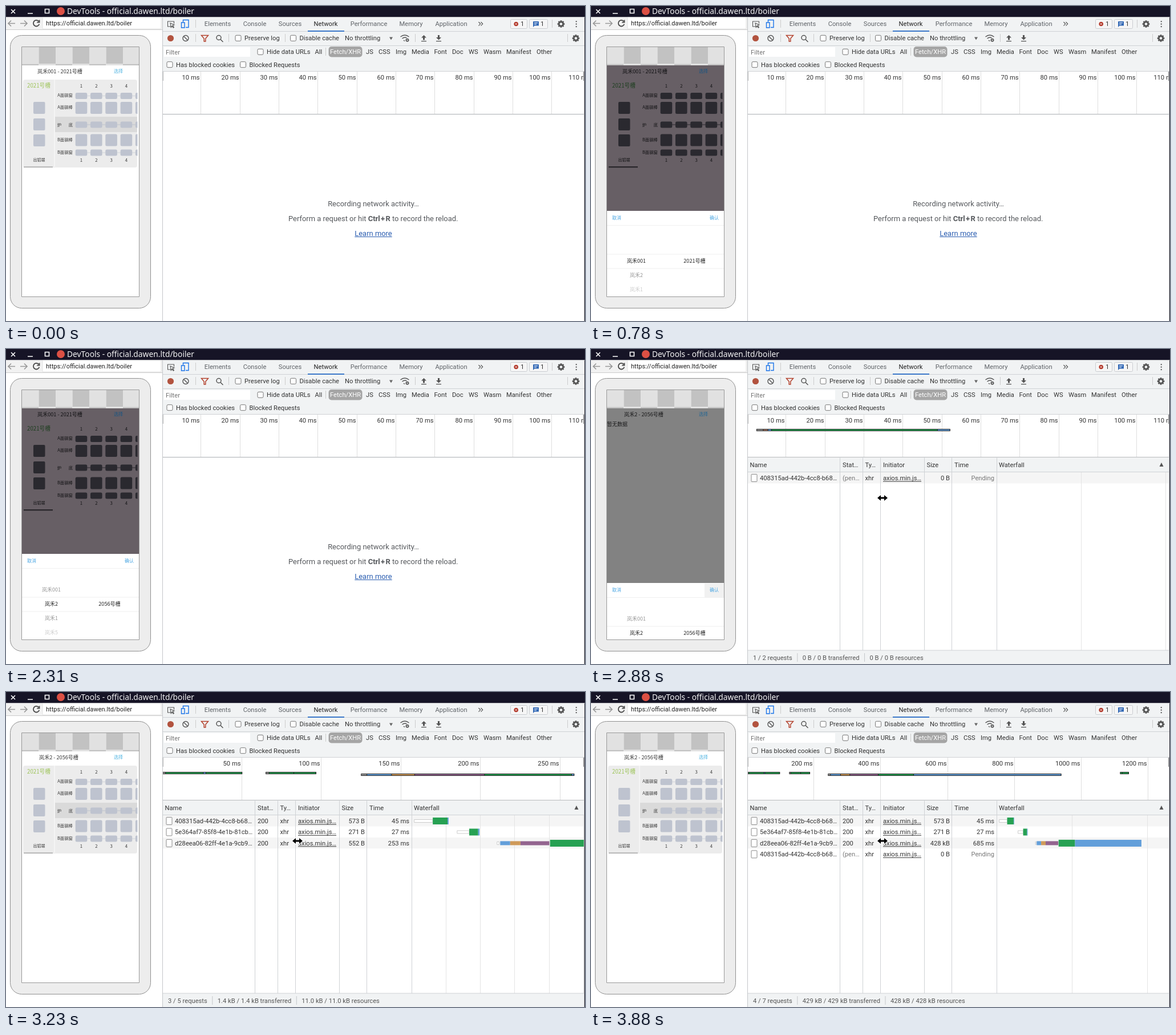
An HTML page with a canvas that plays this animation: 1015 by 552 pixels, repeating every 8 s.

```html
<!DOCTYPE html>
<html lang="en">
<head>
<meta charset="utf-8">
<title>DevTools</title>
<style>
html, body { margin: 0; width: 100%; height: 100%; overflow: hidden; background: #fff; }
canvas { display: block; }
</style>
</head>
<body>
<canvas id="stage" width="1015" height="552"></canvas>
<script>
const c = document.getElementById('stage').getContext('2d');
const LOOP = 8000, STEP = 40;
const UI = 'Roboto, sans-serif', CJK = '"Noto Sans CJK SC", "Noto Sans CJK", sans-serif';
const GREY = '#999', GREEN = '#27a153', BLUE = '#639fda', ORANGE = '#cf9a5a', PURPLE = '#93648f';

const clamp = v => Math.max(0, Math.min(1, v));
const lerp = (a, b, k) => a + (b - a) * k;
const mix = (a, b, k) => `rgb(${a.map((v, i) => Math.round(lerp(v, b[i], k)))})`;
const snap = (t, from) => from + Math.floor((t - from) / STEP) * STEP;

// CSS "ease" curve, solved by bisection
function ease(x) {
  x = clamp(x);
  let lo = 0, hi = 1, s;
  for (let i = 0; i < 20; i++) {
    s = (lo + hi) / 2;
    if (.75 * s * (1 - s) + s ** 3 < x) lo = s; else hi = s;
  }
  return .3 * s * (1 - s) ** 2 + 3 * (1 - s) * s * s + s ** 3;
}

function rect(x, y, w, h, fill, stroke, r = 0) {
  c.beginPath();
  c.roundRect(x, y, w, h, r);
  if (fill) { c.fillStyle = fill; c.fill(); }
  if (stroke) { c.strokeStyle = stroke; c.lineWidth = 1; c.stroke(); }
}

function path(d, color, width = 1.3, fill) {
  const p = new Path2D(d);
  c.strokeStyle = color;
  c.lineWidth = width;
  if (fill) { c.fillStyle = fill; c.fill(p); }
  if (width) c.stroke(p);
}

// y is the middle of the capitals
function text(s, x, y, { size = 11.2, color = '#333', align = 'left', font = UI, weight = 400 } = {}) {
  c.font = `${weight} ${size}px ${font}`;
  c.fillStyle = color;
  c.textAlign = align;
  c.fillText(s, x, y + size * .355);
  return c.measureText(s).width;
}

const cjk = (s, x, y, size, color, align = 'center') => text(s, x, y, { size, color, align, font: CJK });

function clipped(x, y, w, h, draw) {
  c.save();
  c.beginPath();
  c.rect(x, y, w, h);
  c.clip();
  draw();
  c.restore();
}

function gear(x, y, size = 1) {
  c.save();
  c.translate(x, y);
  c.scale(size, size);
  for (let i = 0; i < 8; i++) {
    c.rotate(Math.PI / 4);
    rect(-1.4, -6.3, 2.8, 3, '#555');
  }
  c.beginPath();
  c.arc(0, 0, 3.6, 0, 7);
  c.strokeStyle = '#555';
  c.lineWidth = 2.6;
  c.stroke();
  c.restore();
}

function windowBar() {
  rect(0, 0, 1015, 19.5, '#161426');
  path('M9 6l7 7M16 6l-7 7M38 13h9', '#fff', 1.6);
  path('M68.5 5.5h7v7h-7z', '#fff', 1.6);
  c.beginPath();
  c.arc(96, 9, 7, 0, 7);
  c.fillStyle = '#dc5044';
  c.fill();
  text('DevTools - official.dawen.ltd/boiler', 107, 9.3,
    { size: 13.8, color: '#f4f4f4', font: '"Noto Sans", sans-serif' });

  rect(0, 19.5, 274, 22, '#f2f2f2');
  rect(64, 20, 208, 20, '#fff', '#e2e2e2');
  rect(0, 41, 274, 1, '#ccc');
  path('M16 30.5h-12M9 25.5l-5 5 5 5M25 30.5h12M32 25.5l5 5-5 5', '#999', 1.7);
  path('M57.5 27a5.3 5.3 0 1 0 .8 4.8M58.5 24.5v4.2h-4.2', '#444', 1.8);
  text('https://official.dawen.ltd/boiler', 70, 30.3, { size: 11, color: '#222' });
}

function checkbox(x, y, label) {
  rect(x - 5, y - 5, 10, 10, '#fff', '#767676', 2);
  text(label, x + 11, y);
}

function devToolbar() {
  rect(274, 19.5, 741, 95, '#f1f3f4');
  for (const y of [44, 69, 114]) rect(274, y, 741, 1, '#cfd2d5');
  path('M293 36h-9.500v-9h11v4M288 30l7 3-3 1.200 2.500 3-1.200 1-2.500-3-1.500 2.300z', '#555', 1.1);
  path('M310.500 28v-3.500h9.500v13h-5M307.500 29h5.500v9h-5.500z', '#1a73e8', 1.4);
  rect(332, 24, 1, 14, '#ccc');
  const tabs = { Elements: 371, Console: 436, Sources: 498, Network: 560.5, Performance: 636, Memory: 710, Application: 780.5 };
  for (const name in tabs)
    text(name, tabs[name], 31.2, { align: 'center', color: name === 'Network' ? '#222' : '#5f6368' });
  rect(529, 43, 64, 2, '#3b78c9');
  path('M828.500 28l3.200 3.300-3.200 3.300M832.500 28l3.200 3.300-3.200 3.300', '#555', 1.2);

  rect(884.5, 23.5, 29, 16, '#f6f6f6', '#c9ccd0', 2);
  rect(917.5, 23.5, 32, 16, '#f6f6f6', '#c9ccd0', 2);
  path('M898 31.500a3.800 3.800 0 1 1 -7.600 0a3.800 3.800 0 1 1 7.600 0z', '', 0, '#b3392b');
  path('M892.800 30.100l2.800 2.800M895.600 30.100l-2.800 2.800', '#fff', 1);
  path('M924 27h10v7.500h-7.500l-2.500 2.500z', '', 0, '#3268b5');
  path('M926 29.500h6M926 32h4', '#fff', 1);
  text('1', 902, 31.5);
  text('1', 937, 31.5);
  rect(957, 24, 1, 14, '#ccc');
  gear(973, 31.5);
  for (const y of [27, 31.5, 36]) rect(998.6, y - 1, 2.2, 2.2, '#555', null, 1);

  c.beginPath();
  c.arc(288.5, 56.5, 5.6, 0, 7);
  c.fillStyle = '#b2533f';
  c.fill();
  path('M320 56.500a5 5 0 1 1 -10 0a5 5 0 1 1 10 0zM311.500 53l7 7', '#555', 1.4);
  rect(332, 49, 1, 14, '#ccc');
  path('M342.500 51.500h12l-4.700 5.500v5h-2.600v-5z', '#b4432f', 1.5);
  path('M377 55.500a4 4 0 1 1 -8 0a4 4 0 1 1 8 0zM376 58.500l4.500 4.500', '#555', 1.5);
  rect(390, 49, 1, 14, '#ccc');
  checkbox(407, 56.3, 'Preserve log');
  rect(489, 49, 1, 14, '#ccc');
  checkbox(503.5, 56.3, 'Disable cache');
  text('No throttling', 594, 56.3);
  path('M672 54.500h6l-3 5z', '', 0, '#666');
  path('M691.500 54q7.500-6 15 0M694.500 57q4.500-3.500 8 -1M697 60l2 1.500', '#555', 1.4);
  gear(703.5, 59.8, .5);
  rect(717, 49, 1, 14, '#ccc');
  path('M732.500 51l4.500 4.500h-3v4h-3v-4h-3zM728 61h9v1.200h-9z', '', 0, '#555');
  path('M758.500 59.500l4.500-4.500h-3v-4h-3v4h-3zM754 61h9v1.200h-9z', '', 0, '#555');
  rect(984, 49, 1, 14, '#ccc');
  gear(999, 56.5);

  rect(277, 72, 151, 17, '#fff');
  text('Filter', 280, 81, { color: '#757575' });
  checkbox(446, 80.3, 'Hide data URLs');
  text('All', 541.5, 80.3);
  rect(560, 73, 1, 14, '#ccc');
  rect(565.5, 71, 59, 18.5, '#a5a5a5', null, 5);
  text('Fetch/XHR', 595, 80.3, { color: '#fff', align: 'center' });
  const kinds = { JS: 631, CSS: 653, Img: 683, Media: 711, Font: 750.5, Doc: 782, WS: 811, Wasm: 837, Manifest: 877, Other: 930 };
  for (const k in kinds) text(k, kinds[k], 80.3);
  checkbox(287, 102.7, 'Has blocked cookies');
  checkbox(415.5, 102.7, 'Blocked Requests');
}

function phoneFrame() {
  rect(7.5, 51.5, 246, 478, '#ededed', '#8f8f8f', 20);
  rect(27.5, 71.5, 206, 438, '#fff');
  const shades = ['#e1e1e1', '#c2c2c2'];
  clipped(28, 72, 205, 32, () => {
    for (let i = 0; i < 7; i++) {
      rect(28 + i * 29.5, 72, 29.5, 29.5, shades[i % 2]);
      rect(28 + i * 29.5, 101.5, 29.5, 29.5, shades[1 - i % 2]);
    }
  });
}

function page(t, dim) {
  const shade = t < 2800 && t > 580 ? [103, 95, 101] : [102, 102, 102];
  const paint = v => mix(v, shade, dim);
  const ink = mix([55, 55, 55], [18, 18, 20], dim);
  const tile = mix([190, 195, 207], [42, 41, 47], dim ** 1.35);
  rect(28, 104, 205, 405, paint([255, 255, 255]));
  cjk(t < 2840 ? '岚禾001 - 2021号槽' : '岚禾2 - 2056号槽', t < 2840 ? 94.5 : 92.5, 114.5, 9.1, ink);
  cjk('选择', 197, 114.5, 8, mix([80, 180, 225], [25, 85, 130], dim));
  if (t >= 2840 && t < 3000) {
    cjk('暂无数据', 28, 132, 9, ink, 'left');
    return;
  }
  rect(30, 129, 200, 154, paint([236, 236, 236]), null, 4);
  rect(84, 129, 2, 153, paint([244, 244, 244]));
  rect(86, 194, 144, 27, paint([218, 218, 218]));
  rect(31, 281, 51, 2.2, mix([188, 188, 188], [40, 38, 42], dim));
  cjk('2021号槽', 57.5, 140, 9.7, mix([155, 195, 85], [28, 62, 30], dim));
  cjk('出铝端', 58, 270, 7, ink);
  for (const y of [178.5, 207.5, 235.5]) rect(48, y - 10.5, 20.5, 21, tile, null, 2);
  const rows = [['A面钢窗', 157.5, 11], ['A面钢棒', 178.5, 21], ['', 208, 11], ['B面钢棒', 235, 21], ['B面钢窗', 257, 11]];
  cjk('炉', 93.5, 208, 7.3, ink);
  cjk('底', 113.5, 208, 7.3, ink);
  clipped(86, 129, 144.5, 154, () => {
    for (const [name, y, h] of rows) {
      cjk(name, 103.5, y - 1, 7.4, ink);
      if (h < 20) rect(122, y - .5, 108, 1, name ? paint([208, 211, 218]) : tile);
      for (let i = 0; i < 5; i++) rect(121.7 + i * 26.3, y - h / 2, 20.6, h, tile, null, 2.5);
    }
  });
  for (let i = 0; i < 4; i++)
    for (const y of [140, 270.5]) cjk(i + 1, 132 + i * 26.3, y, 7.8, ink);
}

function picker(t, shown) {
  const top = Math.round(510 - 151 * shown);
  const drag = 1.24 * ease((snap(t, 1740) + STEP - 1740) / 280);
  const scroll = t < 1740 ? 0 : t < 2150 ? drag : lerp(1.24, 1, ease((snap(t, 2150) + STEP - 2150) / 200));
  rect(28, top, 205, 151, '#fff');
  if (t >= 2800) rect(199, top + 1, 34, 25, '#f1f1f1');
  cjk('取消', 45, top + 12.5, 8, '#48a5e2');
  cjk('确认', 216, top + 12.5, 8, '#48a5e2');
  for (const y of [25, 75.5, 100.5]) rect(28, top + y, 205, 1, '#f0f0f0');
  ['001', '2', '1', '5'].forEach((n, i) => {
    const d = Math.abs(i - scroll);
    const g = d < 1 ? lerp(38, 150, d) : lerp(150, 205, clamp(d - 1));
    cjk('岚禾' + n, 79.5, top + 88 + (i - scroll) * 25, 9, `rgb(${g} ${g} ${g})`);
  });
  cjk(t < 2310 ? '2021号槽' : '2056号槽', 181.5, top + 88, 9.1, '#262626');
}

function phone(t) {
  phoneFrame();
  clipped(28, 104, 205, 405, () => {
    const open = snap(t, 500), close = snap(t, 2800);
    const grow = (a, b) => t < 500 || t >= 3080 ? 0 : t < 2800 ? ease((open - a) / 294) : 1 - ease((close - b) / 300);
    page(t, grow(467, 2835));
    const shown = grow(486, 2814);
    if (shown > 0) picker(t, shown);
  });
  rect(27.5, 71.5, 206, 438, null, '#999');
}

// milliseconds on the network clock
function clock(t) {
  if (t < 3000) return 102;
  if (t < 3230) return 258;
  const at = t < 3790 ? Math.min(snap(t, 3230), 3630) : Math.min(snap(t, 3800), 3880);
  return 501 + (at - 3230) * 1.095;
}

function tickStep(scale) {
  for (let p = 1; ; p *= 10)
    for (const m of [1, 2, 5]) if (m * p * scale >= 60) return m * p;
}

function strip(parts, scale, y, end) {
  const x = ms => 273.5 + Math.min(ms, end) * scale;
  parts = parts.filter(p => p[0] < end);
  if (!parts.length) return;
  const from = x(parts[0][0]);
  rect(from, y - 2, x(parts.at(-1)[1]) - from + 1, 4, '#1c1c1c');
  for (const [a, b, color] of parts) rect(x(a) + .8, y - 1, Math.max(.5, x(b) - x(a) - .8), 2, color);
}

function overview(t, now) {
  rect(274, 115, 741, 75, '#fff');
  const range = now < 300 ? 265 : now * 1.053 - 14;
  const labels = 740 / (t < 3000 ? 108.3 : t < 3270 ? 265 : range);
  const scale = 740 / range, step = tickStep(labels);
  clipped(274, 115, 739, 75, () => {
    for (let ms = step; 273.5 + ms * labels < 1045; ms += step) {
      const x = Math.floor(273.5 + ms * labels);
      rect(x, 115, 1, 74, '#dedede');
      text(ms + ' ms', x - 1.5, 125, { align: 'right' });
    }
    if (t >= 2840 && t < 3000)
      strip([[2.4, 4.1, GREY], [4.1, 5.3, '#a77a66'], [5.3, 6.2, BLUE], [6.2, 48.8, GREEN], [48.8, 52, BLUE]], labels, 142, 52);
    else if (t >= 3000) {
      strip([[0, 4, GREY], [4, 50, GREEN], [50, 53, BLUE], [53, 97, GREEN]], scale, 142, now);
      strip([[126, 130, GREY], [130, 160, GREEN], [160, 187, GREEN]], scale, 142, now);
      strip([[242, 249, GREY], [249, 279, BLUE], [279, 307, ORANGE], [307, 392, PURPLE], [392, 498, GREEN], [498, 939, BLUE]], scale, 145, now);
      strip([[1116, 1122, GREEN], [1122, 1141, GREEN]], scale, 142, now);
    }
  });
  rect(274, 115, 1.5, 16, '#777');
  rect(1012, 115, 1.5, 16, '#777');
  rect(274, 189, 741, 1.5, '#b9bcbf');
}

function waterfall(now, count) {
  const range = Math.min(now, 1142), scale = 302 / range, step = tickStep(scale);
  for (let ms = step; ms * scale < 302; ms += step) rect(Math.floor(711 + ms * scale), 216, 1, 312, '#e4e4e4');
  if (count < 2) return;
  // each part: start, end, height, colour (none = queueing)
  const rows = [
    [[0, 54, 5], [55, 98, 12, GREEN], [98, 101, 12, BLUE]],
    [[125, 160, 5], [161, 187, 12, GREEN], [187, 191, 12, BLUE]],
    [[241, 247, 5], [251, 280, 7, BLUE], [280, 310, 7, ORANGE], [310, 394, 7, PURPLE], [396, 505, 12, GREEN], [505, 945, 12, BLUE]]
  ];
  rows.forEach((row, i) => {
    const y = 226 + i * 19.45;
    for (const [a, b, h, color] of row) {
      if (a >= now) continue;
      const x = 715 + a * scale, w = (Math.min(b, now) - a) * scale;
      if (color) rect(x, y - h / 2, w, h, color);
      else rect(x + .5, y - h / 2, w, h, '#fff', '#ccc');
    }
  });
}

const bytes = n => n < 1000 ? n + ' B' : (n < 1e5 ? (n / 1000).toFixed(1) : Math.round(n / 1000)) + ' kB';

function table(t, now) {
  const count = t < 3000 ? 1 : t < 3790 ? 3 : 4;
  const third = Math.round(552 + 427448 * clamp((now - 501) / 438));
  const names = ['408315ad-442b-4cc8-b68…', '5e364af7-85f8-4e1b-81cb…', 'd28eea06-82ff-4e1a-9cb9…', '408315ad-442b-4cc8-b68…'];
  const sizes = [573, 271, third, 0];
  const times = [45, 27, Math.round(Math.min(685, now - 248)), 0];
  rect(274, 190.5, 741, 362, '#fff');
  for (let i = 0; i < count; i += 2) rect(275, 216 + i * 19.45, 738, 19.45, '#f5f5f5');
  clipped(711, 216, 302, 312, () => waterfall(now, count));
  rect(274, 190.5, 741, 25, '#f1f3f4');
  rect(274, 215, 741, 1, '#cfd2d5');
  const heads = { Name: 278.5, 'Stat…': 441, 'Ty…': 480.5, Initiator: 512, Size: 588.5, Time: 637, Waterfall: 715 };
  for (const h in heads) text(h, heads[h], 203);
  path('M996.500 206h7l-3.500-7z', '', 0, '#555');

  for (let i = 0; i < count; i++) {
    const y = 226 + i * 19.45;
    const pending = count === 1 || i === 3 || (i === 2 && t < 3230);
    const color = pending ? '#777' : '#333';
    rect(281, y - 6.5, 10, 13, '#fff', '#8a8a8a', 1);
    text(names[i], 296, y);
    text(pending ? '(pen…' : '200', 441, y, { color });
    text('xhr', 480.5, y);
    const w = text('axios.min.js…', 512, y);
    rect(512, y + 5.4, w, 1, '#333');
    text(pending ? '0 B' : bytes(sizes[i]), 629, y, { align: 'right' });
    text(pending ? 'Pending' : times[i] + ' ms', 707, y, { align: 'right', color });
  }
  for (const x of [436, 476, 507, 584, 632, 711]) rect(x, 190.5, 1, 337.5, '#cfd2d5');

  rect(274, 528, 741, 24, '#f1f3f4');
  rect(274, 527.5, 741, 1, '#cfd2d5');
  const moved = count === 1 ? 0 : t < 3230 ? 844 : 844 + third;
  const total = count === 1 ? 0 : Math.max(11000, third);
  const sums = [
    count === 1 ? '1 / 2 requests' : count === 4 ? '4 / 7 requests' : t < 3630 ? '3 / 5 requests' : '3 / 6 requests',
    `${bytes(moved)} / ${bytes(moved)} transferred`,
    `${bytes(total)} / ${bytes(total)} resources`
  ];
  let x = 284;
  sums.forEach((s, i) => {
    if (i) rect(x - 9.5, 533, 1, 15, '#c4c7ca');
    x += text(s, x, 540.7, { color: '#555' }) + 18;
  });
  // column resize pointer
  const arrows = 'M502 261l6-5v3.500h6v-3.500l6 5-6 5v-3.500h-6v3.500z';
  path(arrows, '#fff', 2.2);
  path(arrows, '', 0, '#000');
}

function emptyLog() {
  const size = 12.95, color = '#55585c';
  rect(274, 190.5, 741, 362, '#fff');
  text('Recording network activity…', 644, 346.5, { size, color, align: 'center' });
  let x = 495;
  x += text('Perform a request or hit ', x, 372.3, { size, color });
  x += text('Ctrl\u200a+\u200aR', x, 372.3, { size, color, weight: 700 });
  text(' to record the reload.', x, 372.3, { size, color });
  const w = text('Learn more', 644, 398.3, { size, color: '#2a5db0', align: 'center' });
  rect(644 - w / 2, 404, w, 1, '#2a5db0');
}

function draw(t) {
  rect(0, 0, 1015, 552, '#fff');
  const now = clock(t);
  windowBar();
  devToolbar();
  phone(t);
  overview(t, now);
  if (t < 2840) emptyLog(); else table(t, now);
  rect(274, 19.5, 1, 533, '#c4c7ca');
  rect(1013, 115, 1, 437, '#c9ccd0');
  rect(1014, 19.5, 1, 533, '#24242e');
}

const start = performance.now();
function frame() {
  draw((performance.now() - start) % LOOP);
  requestAnimationFrame(frame);
}
frame();
</script>
</body>
</html>
```
